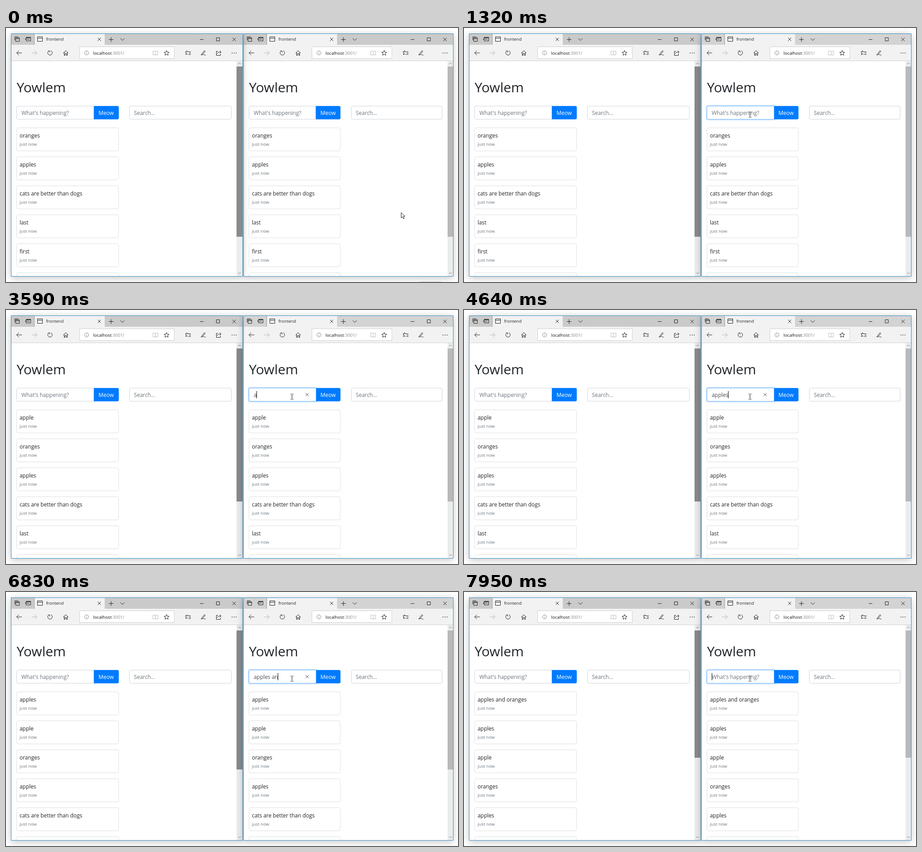
Recreate the animation shown at these times as an HTML page with a canvas. Size 998 px wide and 561 px high, loop 8 s.

```html
<!DOCTYPE html>
<html lang="en">
<head>
<meta charset="utf-8">
<title>Message feed in two browsers</title>
<style>
html, body { margin: 0; width: 100%; height: 100%; overflow: hidden; background: #fff; }
canvas { display: block; }
</style>
</head>
<body>
<canvas id="stage" width="998" height="561"></canvas>
<script>
const ctx = document.getElementById('stage').getContext('2d');
const LOOP = 8000, CLICK = 810;
const INK = '#212529', MUTED = '#6c757d', BLUE = '#007bff';
const BODY = 11.9, SMALL = 9.7;
const PLACEHOLDER = "What's happening?";

// Each post: its text, the time of every key press, and the time it is sent.
const posts = [
  { text: 'apple', keys: [1470, 1860, 2010, 2160, 2310], sent: 2690 },
  { text: 'apples', keys: [3590, 3970, 4120, 4270, 4420, 4570], sent: 4790 },
  { text: 'apples and oranges', sent: 7950,
    keys: [5240, 5620, 5770, 6080, 6150, 6220, 6530, 6680, 6830, 6900, 6980,
           7280, 7350, 7430, 7500, 7580, 7650, 7730] }
];
const oldPosts = ['oranges', 'apples', 'cats are better than dogs', 'last', 'first', 'hello'];
const thumbEnds = [461, 423, 392, 366];

// start: shift of left-aligned parts, bar: of the address bar's end, end: of right-aligned parts
const windows = [
  { x: 11, w: 511, start: 0, bar: 0, end: 0, button: [194, 249], search: [272, 497], scroll: [509, 13], thumb: '#8a8a8a', share: true },
  { x: 524, w: 463, start: 513, bar: 480.5, end: 465.5, button: [684, 738.5], search: [762, 962.5], scroll: [975, 12], thumb: '#b9b9b9' }
];

const clamp = v => Math.max(0, Math.min(1, v));

function rect(x, y, w, h, color) {
  ctx.fillStyle = color;
  ctx.fillRect(x, y, w, h);
}

function text(str, x, y, size = BODY, color = INK) {
  ctx.font = `${size}px "Open Sans", "Noto Sans", sans-serif`;
  ctx.fillStyle = color;
  ctx.fillText(str, x, y);
  return ctx.measureText(str).width;
}

function box(x, y, w, h, radii, stroke, fill, line = 1) {
  ctx.beginPath();
  ctx.roundRect(x, y, w, h, radii);
  if (fill) { ctx.fillStyle = fill; ctx.fill(); }
  if (stroke) { ctx.strokeStyle = stroke; ctx.lineWidth = line; ctx.stroke(); }
}

function icon(path, dx = 0, color = '#222', line = 1) {
  ctx.save();
  ctx.translate(dx, 0);
  ctx.strokeStyle = color;
  ctx.lineWidth = line;
  ctx.stroke(new Path2D(path));
  ctx.restore();
}

function drawChrome(win, active) {
  const { x, w, start, bar, end } = win;
  ctx.save();
  ctx.shadowColor = 'rgba(0,0,0,.24)';
  ctx.shadowBlur = 15;
  ctx.shadowOffsetY = 3;
  rect(x, 12, w, 537, '#fff');
  ctx.restore();

  rect(x, 13, w, 25, start && active ? '#d3d3d3' : '#cacaca');
  rect(62 + start, 13, 156, 25, '#f2f2f2');
  rect(62 + start, 13, 1, 24, '#999');
  rect(x, 37, w, 35, '#f2f2f2');
  rect(x, 72, w, 1, '#d2d2d2');

  // Tab strip
  icon('M19.5 27V19.5H27M21.5 21.5H29.5V29.5H21.5ZM21.5 23.5H29.5', start);
  icon('M44.5 23V20.5H54.5V28.5H44.5V26M44.5 21.5H54.5M52 24.5H42M44.5 22.5L42.5 24.5L44.5 26.5', start);
  icon('M69.5 19.5H80.5V29.5H69.5ZM69.5 22.5H80.5', start);
  text('frontend', 88.4 + start, 28, 9.5);
  icon('M202.5 21.5L209.5 28.5M209.5 21.5L202.5 28.5M227 25.5H237M232 20.5V30.5M252.5 23L257 27.5L261.5 23', start);
  icon('M428 25.5H436M464.5 21.5H471.5V28.5H464.5ZM500 21.5L507.5 29M507.5 21.5L500 29', end);

  // Toolbar
  icon('M35 55H23.5M28.5 50L23.5 55L28.5 60', start);
  icon('M57 55H68.5M63.5 50L68.5 55L63.5 60', start, '#b5b5b5');
  icon('M94 51A5 5 0 1 0 99 50.2M93 50.5H96.5V54', start);
  icon('M126.5 55.5L132 50L137.5 55.5M128.5 54V60.5H130.5V56.5H133.5V60.5H135.5V54', start);
  const left = 162.5 + start;
  box(left, 41.5, 371.5 + bar - left, 26, 0, '#cfcfcf', '#fff');
  icon('M182.5 55A4.5 4.5 0 1 1 173.5 55A4.5 4.5 0 1 1 182.5 55M178 54.5V57.5M178 52V53', start, '#888');
  const host = text('localhost', 192.5 + start, 58.5, SMALL, '#111');
  text(':3001/', 192.5 + start + host, 58.5, SMALL, '#888');
  icon('M324.5 51H329L330 52L331 51H335.5V59.5H324.5ZM330 52V59', bar, '#bbb');
  icon('M354.5 49.5L356 53.3L360 53.6L357 56.2L358 60.2L354.5 58L351 60.2L352 56.2L349 53.6L353 53.3Z', bar);
  icon('M402 52.5H408M404 55.5H408M403 58.5H408M402 52.5H400.5L399.5 50L398.5 52.5H396L398 55L397 59L399.5 57L401.5 58.5', bar);
  icon('M431 59L438 50L440 51.5L433 59.5H430.5M433 59.5C437 56 436 61 441 59.5', bar);
  if (win.share) icon('M468 51.5H464.5V60.5H473.5V57M466.5 57C467 54 469 53 475 53M472 50L475 53L472 56');
  for (const i of [0, 1, 2]) rect(498.5 + end + i * 4.5, 54.5, 1.6, 1.6, '#222');
}

function drawPage(win, list, thumbEnd) {
  const { start, button, search } = win;
  ctx.save();
  ctx.beginPath();
  ctx.rect(win.x, 73, win.w, 475);
  ctx.clip();

  text('Yowlem', 23.5 + start, 142, 30);
  const left = 23.5 + start;
  box(left, 172.5, button[0] - left, 29, [3, 0, 0, 3], '#ced4da', '#fff');
  box(button[0], 172.3, button[1] - button[0], 29.4, [0, 3, 3, 0], null, BLUE);
  text('Meow', button[0] + 10.3, 192.3, BODY, '#fff');
  box(search[0] + .5, 172.5, search[1] - search[0], 29, 3, '#ced4da', '#fff');
  text('Search...', search[0] + 10.5, 192.3, BODY, MUTED);

  list.slice(0, 6).forEach((message, i) => {
    const y = 220.5 + i * 64;
    box(left, y, button[1] - left - .5, 51, 3, '#dfdfdf');
    text(message, left + 6.5, y + 21);
    text('just now', left + 6.5, y + 39.3, SMALL, MUTED);
  });

  const [sx, sw] = win.scroll;
  rect(sx, 73, sw, 475, '#ececec');
  rect(sx, 85, sw, thumbEnd - 85, win.thumb);
  icon('M-3 80L0 77L3 80M-3 540L0 543L3 540', sx + 6.5, '#777');
  ctx.restore();
}

function drawInput(t) {
  const post = posts.find(p => t < p.sent);
  const typed = post ? post.text.slice(0, post.keys.filter(k => t >= k).length) : '';
  const ring = t < 880 ? 0 : clamp((t - CLICK) / 150);
  if (ring) {
    ctx.globalAlpha = ring;
    box(535.5, 171.5, 149.5, 31, [4, 0, 0, 4], 'rgba(0,123,255,.22)', null, 3);
    box(536.5, 172.5, 148, 29, [3, 0, 0, 3], '#80bdff', '#fff');
    ctx.globalAlpha = 1;
  }
  let caretX = 547;
  if (typed) {
    caretX += text(typed, 547, 192.3, BODY, '#495057');
    icon('M661.5 183.5L668.5 190.5M668.5 183.5L661.5 190.5', 0, '#555');
  } else {
    text(PLACEHOLDER, 547, 192.3, BODY, MUTED);
  }
  if (t < CLICK) return;
  // An idle caret in the empty field fades out and returns after a blink.
  const since = t - Math.max(CLICK, ...posts.map(p => p.sent).filter(s => s <= t));
  ctx.globalAlpha = typed || since < 310 || since >= 830 ? 1 : clamp((520 - since) / 280);
  rect(Math.floor(caretX), 179, 1, 16, '#000');
  ctx.globalAlpha = 1;
}

function drawPointer(t) {
  const step = t < 70 ? 0 : Math.min(6, 1 + Math.floor((t - 70) / 72));
  const p = step / 6, ease = p * p * (3 - 2 * p);
  const x = 872 + (631 - 872) * ease, y = 407 + (191 - 407) * ease;
  ctx.save();
  ctx.translate(Math.round(x), Math.round(y));
  if (step === 6) {
    icon('M-2.5 -5.5H-.5M1.5 -5.5H3.5M.5 -5V6M-2.5 6.5H-.5M1.5 6.5H3.5', 0, '#111');
  } else {
    const arrow = new Path2D('M.5 .5V12.5L3.3 9.8L5.3 14.3L7.3 13.4L5.3 9H9Z');
    ctx.fillStyle = '#fff';
    ctx.fill(arrow);
    ctx.strokeStyle = '#222';
    ctx.lineWidth = 1;
    ctx.stroke(arrow);
  }
  ctx.restore();
}

function draw(now) {
  const t = now % LOOP;
  const sent = posts.filter(p => t >= p.sent).map(p => p.text);
  const list = [...sent.reverse(), ...oldPosts];
  const rightActive = t >= CLICK;

  rect(0, 0, 998, 561, '#fff');
  const order = rightActive ? windows : [...windows].reverse();
  for (const win of order) {
    const isRight = win === windows[1];
    drawChrome(win, isRight === rightActive);
    drawPage(win, list, thumbEnds[sent.length]);
    if (isRight) drawInput(t);
    else text(PLACEHOLDER, 34, 192.3, BODY, MUTED);
    box(win.x + .5, 12.5, win.w, 536, 0, '#3a8fc8');
  }
  if (!rightActive) {
    ctx.setLineDash([1, 1]);
    icon('M914 560.5H962', 0, '#6f9aa0');
    ctx.setLineDash([]);
  }
  drawPointer(t);
}

const began = performance.now();
function frame() {
  draw(performance.now() - began);
  requestAnimationFrame(frame);
}
frame();
</script>
</body>
</html>
```
